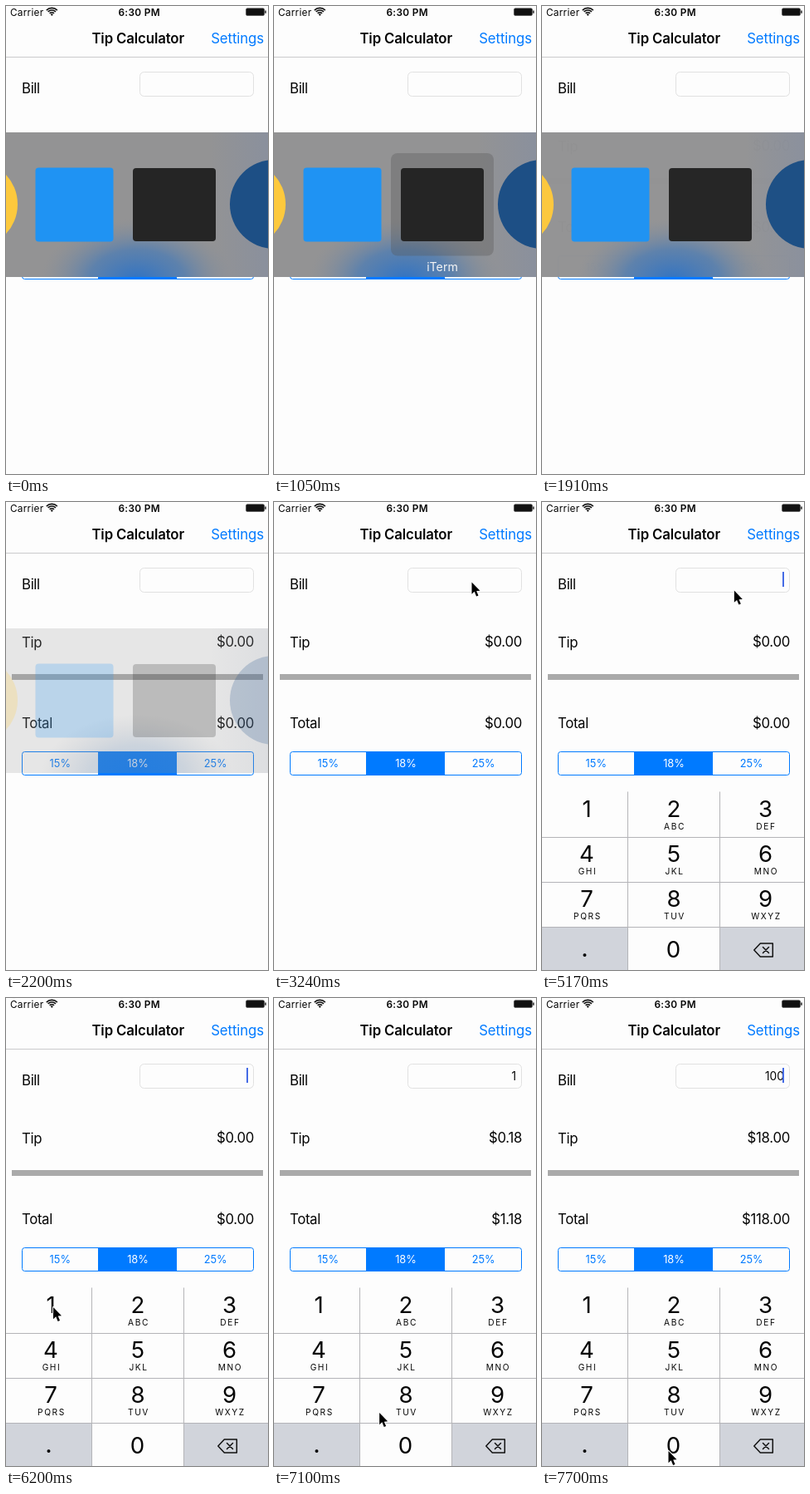
An HTML page with a canvas for the animation above (8000 ms loop, 316 px wide and 563 px high).

```html
<!DOCTYPE html>
<html lang="en">
<head>
<meta charset="utf-8">
<title>Tip Calculator</title>
<style>
html, body { margin: 0; width: 100%; height: 100%; overflow: hidden; background: #fdfdfd; }
canvas { display: block; width: 316px; height: 563px; }
</style>
</head>
<body>
<canvas id="stage"></canvas>
<script>
const W = 316, H = 563, LOOP = 8000;
const BLUE = '#007aff', PAPER = '#fdfdfd';
const canvas = document.getElementById('stage');
const dpr = window.devicePixelRatio || 1;
canvas.width = Math.round(W * dpr);
canvas.height = Math.round(H * dpr);
const ctx = canvas.getContext('2d');

const BEAT = 147.87, FIRST_BEAT = 126;
const beatAt = t => Math.floor((t - FIRST_BEAT) / BEAT);

const FOCUS = 4200;
const TAPS = [6350, 7400, 7700];
const BLINK = 960;

const moves = [
  { start: 2250, end: 2780, x: 238, y: 73 },
  { start: 2780, end: 3230, x: 238.5, y: 96.5 },
  { start: 5020, end: 6180, x: 57, y: 372 },
  { start: 6500, end: 7370, x: 152.5, y: 545 }
];

const apps = [
  { label: 'Web Browser', color: '#fdc93d', round: 52 },
  { label: 'Folder', color: '#1f93f3', w: 94, h: 89 },
  { label: 'iTerm', color: '#252525', w: 100, h: 88 },
  { label: 'CodeBranch', color: '#1d4f85', round: 53.5 }
];
apps.forEach((app, i) => { app.x = -38 + i * 120.5; });

const progress = (t, start, end) => Math.min(1, Math.max(0, (t - start) / (end - start)));
const smooth = p => p * p * (3 - 2 * p);

function pointerAt(time) {
  let x = 340, y = 260;
  for (const move of moves) {
    const p = smooth(progress(time, move.start, move.end));
    x += (move.x - x) * p;
    y += (move.y - y) * p;
  }
  return [x, y];
}

function caretShown(t) {
  if (t < FOCUS) return false;
  const last = [FOCUS, ...TAPS].filter(tap => tap <= t).pop();
  return (t - last) % BLINK < BLINK / 2;
}

function text(str, x, y, size, opt = {}) {
  ctx.font = `${opt.weight || 400} ${size}px Inter, "Open Sans", sans-serif`;
  ctx.letterSpacing = `${opt.gap || 0}px`;
  ctx.textAlign = opt.align || 'left';
  ctx.fillStyle = opt.color || '#050505';
  ctx.fillText(str, x, y);
}

function rect(x, y, w, h, color) {
  ctx.fillStyle = color;
  ctx.fillRect(x, y, w, h);
}

function roundRect(x, y, w, h, r) {
  ctx.beginPath();
  ctx.roundRect(x, y, w, h, r);
}

function stroke(color, width = 1) {
  ctx.strokeStyle = color;
  ctx.lineWidth = width;
  ctx.stroke();
}

function polygon(points) {
  ctx.beginPath();
  for (const [x, y] of points) ctx.lineTo(x, y);
  ctx.closePath();
}

function drawStatus() {
  text('Carrier', 5, 11.5, 11.8, { gap: 0.25 });
  text('6:30 PM', 160.7, 11.5, 11.8, { weight: 600, align: 'center', gap: 0.35 });
  for (const r of [3.8, 6.6, 9.2]) {
    ctx.beginPath();
    ctx.arc(55.3, 11.6, r, -Math.PI * 0.75, -Math.PI * 0.25);
    stroke('#111', 1.6);
  }
  ctx.fillStyle = '#111';
  ctx.beginPath();
  ctx.moveTo(55.3, 12);
  ctx.arc(55.3, 11.6, 2.2, -Math.PI * 0.75, -Math.PI * 0.25);
  ctx.fill();
  roundRect(289.5, 2.8, 22, 8.6, 1.5);
  ctx.fill();
  stroke('#444', 0.6);
  roundRect(312.3, 5.2, 1.4, 3.8, 0.7);
  ctx.fill();
}

function drawForm(bill, caret) {
  const body = { gap: -0.35 }, right = { gap: -0.3, align: 'right' };
  const money = n => '$' + n.toFixed(2);
  const amount = Number(bill), tip = amount * 0.18;

  text('Tip Calculator', 159.2, 45, 16.8, { weight: 600, gap: -0.12, align: 'center' });
  text('Settings', 311, 45, 16.8, { gap: -0.1, align: 'right', color: BLUE });
  rect(0, 61, W, 1, '#cacacc');

  text('Bill', 19, 105, 16.8, body);
  roundRect(161.5, 79.5, 137, 29, 5);
  stroke('#e1e1e1');
  text(bill, 292, 98.8, 13.8, { align: 'right' });
  if (caret) rect(290, 84, 2, 18, '#456be5');

  text('Tip', 19, 174.7, 16.8, body);
  text(money(tip), 299, 173.7, 16.8, right);
  rect(7, 207, 303, 7, '#aaaaaa');
  text('Total', 19, 271.5, 16.8, body);
  text(money(amount + tip), 299, 271.5, 16.8, right);

  roundRect(19.5, 300.5, 279, 28, 3);
  stroke(BLUE);
  rect(111, 300, 95, 29, BLUE);
  ['15%', '18%', '25%'].forEach((label, i) => {
    text(label, 65.3 + i * 93.7, 319, 12.8, { align: 'center', color: i === 1 ? '#fff' : BLUE });
  });
}

function drawDelete(x, y) {
  ctx.lineJoin = ctx.lineCap = 'round';
  polygon([[x, y + 8.5], [x + 7.5, y + 0.5], [x + 22.5, y + 0.5], [x + 22.5, y + 16.5], [x + 7.5, y + 16.5]]);
  stroke('#111', 1.5);
  ctx.beginPath();
  for (const side of [-3.5, 3.5]) {
    ctx.moveTo(x + 14.2 - side, y + 5);
    ctx.lineTo(x + 14.2 + side, y + 12);
  }
  stroke('#111', 1.5);
}

function drawKeyboard(time) {
  const offset = 220 * (1 - progress(time, 4050, 4566)) ** 3;
  const centers = [54, 159, 269.5], line = '#b4b4b8', key = '#d1d4db';
  const letters = ['', 'ABC', 'DEF', 'GHI', 'JKL', 'MNO', 'PQRS', 'TUV', 'WXYZ'];
  ctx.save();
  ctx.translate(0, offset);
  rect(0, 348.5, W, 220, PAPER);
  rect(0, 511, 103, 60, key);
  rect(215, 511, 101, 60, key);
  for (let i = 0; i < 3; i++) rect(0, 403 + i * 54, W, 1, line);
  for (const x of [103, 214]) rect(x, 348.5, 1, 220, line);
  letters.forEach((word, i) => {
    const x = centers[i % 3], y = 379 + Math.floor(i / 3) * 54;
    text(String(i + 1), x, y, 27.6, { align: 'center' });
    text(word, x + 1, y + 15.3, 10.2, { align: 'center', gap: 1.6 });
  });
  text('0', 158.5, 548.3, 27.6, { align: 'center' });
  text('.', 51.5, 546.5, 25, { align: 'center', weight: 600 });
  drawDelete(255.8, 530.5);
  ctx.restore();
}

function drawBackdrop() {
  rect(0, 152, W, 174, '#939394');
  const side = ctx.createLinearGradient(245, 0, W, 0);
  side.addColorStop(0, 'rgba(125,140,170,0)');
  side.addColorStop(1, 'rgba(125,140,170,0.4)');
  rect(245, 152, 71, 174, side);

  ctx.save();
  ctx.translate(158, 330);
  ctx.scale(1, 0.64);
  const glow = ctx.createRadialGradient(0, 0, 0, 0, 0, 116);
  glow.addColorStop(0, 'rgba(48,115,196,1)');
  glow.addColorStop(0.5, 'rgba(80,125,178,0.8)');
  glow.addColorStop(1, 'rgba(130,140,155,0)');
  rect(-160, -160, 320, 160, glow);
  ctx.restore();
}

function drawPanel(time, picked) {
  const alpha = 1 - smooth(progress(time, 1870, 2340));
  if (!alpha) return;
  ctx.save();
  ctx.globalAlpha = alpha;
  ctx.beginPath();
  ctx.rect(0, 152, W, 174);
  ctx.clip();
  drawBackdrop();

  if (picked) {
    roundRect(picked.x - 62, 177, 124, 123.5, 8);
    ctx.fillStyle = 'rgba(85,85,85,0.34)';
    ctx.fill();
    text(picked.label, picked.x, 319.3, 14.2, { align: 'center', color: '#f4f4f4' });
  }
  for (const app of apps) {
    if (app.round) {
      ctx.beginPath();
      ctx.arc(app.x, 238.5, app.round, 0, Math.PI * 2);
    } else {
      roundRect(app.x - app.w / 2, 239 - app.h / 2, app.w, app.h, 4);
    }
    ctx.fillStyle = app.color;
    ctx.fill();
  }
  ctx.restore();
}

function drawPointer(x, y) {
  ctx.save();
  ctx.translate(x, y);
  ctx.lineJoin = 'round';
  polygon([[0, 0], [0, 14.2], [3.2, 11.3], [5.6, 17], [8, 16], [5.7, 10.6], [10, 10.3]]);
  stroke('#fff', 2);
  ctx.fillStyle = '#000';
  ctx.fill();
  ctx.restore();
}

function draw(t) {
  const beat = beatAt(t), time = FIRST_BEAT + beat * BEAT;
  const bill = '100'.slice(0, TAPS.filter(tap => tap <= t).length);
  ctx.setTransform(dpr, 0, 0, dpr, 0, 0);
  rect(0, 0, W, H, PAPER);
  drawStatus();
  drawForm(bill, caretShown(t));
  drawKeyboard(time);
  drawPanel(time, apps[beat - beatAt(750)]);
  drawPointer(...pointerAt(time));
}

const start = performance.now();
function tick() {
  draw((performance.now() - start) % LOOP);
  requestAnimationFrame(tick);
}
tick();
</script>
</body>
</html>
```
